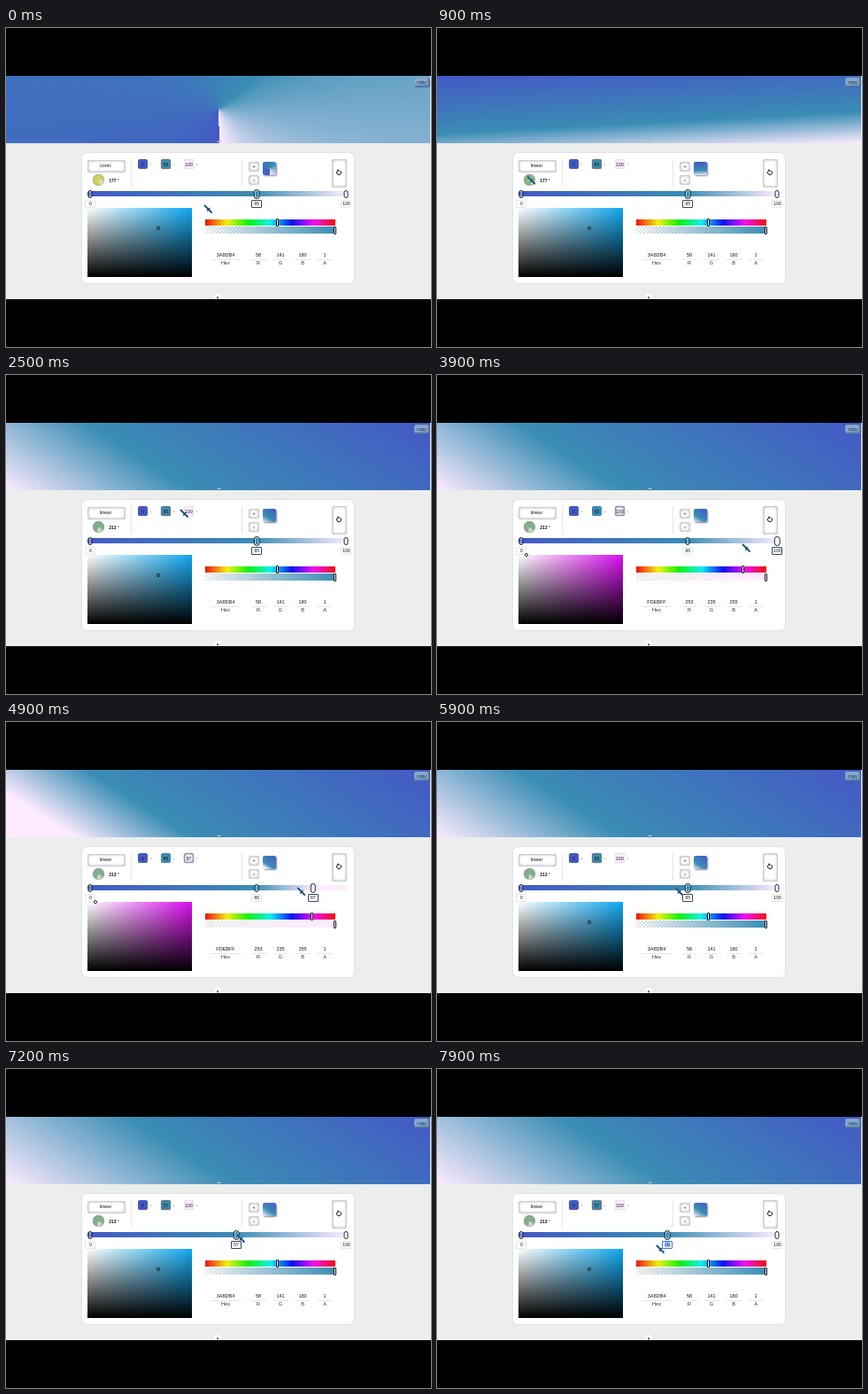
Animation of 480x360 px, one loop 8000 ms. Source, as an HTML page:

```html
<!DOCTYPE html>
<html lang="en">
<head>
<meta charset="utf-8">
<title>Gradient editor</title>
<style>
html, body { margin: 0; width: 100%; height: 100%; overflow: hidden; background: #000; }
#stage { position: absolute; left: 0; top: 0; width: 480px; height: 360px; overflow: hidden; background: #000;
  font: 5.5px/1 "Liberation Sans", Arial, sans-serif; color: #111; }
#stage div { position: absolute; box-sizing: border-box; }
#stage svg { position: absolute; left: 0; top: 0; overflow: visible; }
.t { white-space: nowrap; transform: translate(-50%, -50%); }
.btn { background: #fff; border-radius: 3px; box-shadow: inset 0 0 3px 1px #b4b4bc, 0 0 1px #ccc; }
.sw { border-radius: 2.5px; box-shadow: inset 0 0 1px #3338; }
.sw.on { box-shadow: inset 0 0 2px 1px #68757e, 0 0 2px #aaa; }
.grip { width: 5px; height: 9px; top: 183px; border: 1px solid #1b2733; border-radius: 3px;
  box-shadow: inset 0 0 0 .8px #fff; transform: translateX(-50%); }
.grip.on { width: 6.5px; height: 10.5px; top: 182px; border-radius: 3.5px; }
.tag { border: 1px solid #e6e6e6; border-radius: 1px; transform: translateX(-50%); background: #fff; }
.tag.on { border-color: #34465a; }
.tag.on.hit { border-color: #3b78d8; }
.hit .t { background: #3973d0; color: #fff; }
.pin { border: 1px solid #111; border-radius: 1px; background: #fff; }
</style>
</head>
<body>
<div id="stage"></div>
<script>
const LOOP = 8000;
const COLORS = ['#4459c5', '#3a8db4', '#fdebff'];
const stage = document.getElementById('stage');

function box(x, y, w, h, css = '', cls = '', parent = stage) {
  const el = document.createElement('div');
  el.className = cls;
  el.style.cssText = `left:${x}px;top:${y}px;width:${w}px;height:${h}px;${css}`;
  return parent.appendChild(el);
}
function label(x, y, str, css = '', parent = stage) {
  const el = document.createElement('div');
  el.className = 't';
  el.style.cssText = `left:${x}px;top:${y}px;${css}`;
  el.textContent = str;
  return parent.appendChild(el);
}
function svg(markup) {
  const el = document.createElementNS('http://www.w3.org/2000/svg', 'svg');
  el.setAttribute('width', 480);
  el.setAttribute('height', 360);
  el.innerHTML = markup;
  return stage.appendChild(el);
}
function describe(hex) {
  const rgb = [1, 3, 5].map(i => parseInt(hex.slice(i, i + 2), 16));
  const [r, g, b] = rgb, max = Math.max(...rgb), span = max - Math.min(...rgb);
  const side = max === r ? (g - b) / span : max === g ? 2 + (b - r) / span : 4 + (r - g) / span;
  return { rgb, hue: (side * 60 + 360) % 360, sat: span / max, val: max / 255 };
}

// Page, banner and card
box(0, 54, 480, 252, 'background:#ebeeed');
const banner = box(0, 54, 479, 76);
box(461, 56, 17, 10, 'border-radius:2px;background:#86a9cc;box-shadow:inset -1px -1px 2px #466f9f,1px 1px 1px #456cab');
label(469.5, 61, 'copy', 'color:#15283c;font-size:5px');
label(240.5, 128.5, '•••', 'color:#fff;font-size:4.5px;text-shadow:0 0 1px #334');
box(235, 300, 8, 6, 'background:#fff;border-radius:4px 4px 0 0');
label(239, 304, '▾', 'font-size:5px;color:#222');
box(85, 140, 309, 149, 'background:#fff;border:1px solid #e0e3e3;border-radius:7px');

// Type, angle and swatches
box(92, 149, 43, 14, '', 'btn');
const type = label(112.5, 156, '');
const knob = box(97.5, 165, 13, 13, 'border-radius:50%;box-shadow:inset 0 0 2px #888,0 0 1px #aaa');
const angle = label(122, 171.5, '', 'font-weight:bold;font-size:5px');
for (const x of [141, 266]) box(x, 148, 1, 31, 'background:#e6e6e6');

const swatches = COLORS.map((color, i) => {
  const x = 149 + i * 26;
  const el = box(x, 148, 11, 11, `background:${color}`, 'sw');
  label(x + 14.5, 153.5, '×', 'color:#b5a5aa;font-size:5px');
  return { el, text: label(5.5, 5.7, '', 'font-size:5px', el) };
});

// Action buttons
box(274, 151, 12, 11, '', 'btn');
label(280, 156, '+', 'font-size:6px');
box(274, 166, 12, 11, '', 'btn');
label(280, 171.5, '×', 'font-size:6px;color:#d04452');
const preview = box(290, 151, 15, 15, 'border-radius:2px;box-shadow:1px 1px 2px #889');
box(367.5, 148, 17, 32, '', 'btn');
svg('<path d="M377.5 161.2a2.5 2.5 0 1 1-3 0M374 160.3h1.8v1.8" fill="none" stroke="#111"/>');

// Stop track
const track = box(92, 184, 293, 6, 'border-radius:2px');
const stopX = v => 95.4 + v * 2.89;
const stops = COLORS.map(color => {
  const tag = box(0, 194, 12, 8.5, '', 'tag');
  return { tag, text: label(5, 3.3, '', 'font-size:5px', tag), grip: null, color };
});
for (const s of stops) {
  s.grip = stage.appendChild(document.createElement('div'));
  s.grip.className = 'grip';
  s.grip.style.background = s.color;
}

// Colour picker
const field = box(92, 203, 118, 78);
const spot = box(0, 0, 3.6, 3.6, 'border:.8px solid #111;border-radius:50%');
const hues = Array.from({ length: 7 }, (_, i) => `hsl(${i * 60} 88% 50%)`);
box(225, 216, 147, 7, `background:linear-gradient(90deg,${hues})`);
box(225, 224, 147, 8, 'background:repeating-conic-gradient(#e6e6e6 0 25%,#fff 0 50%) 0 0/4px 4px');
const alpha = box(225, 224, 147, 8);
const huePin = box(0, 215, 3, 9, '', 'pin');
box(370, 223.5, 3, 9.5, '', 'pin');
const fields = ['Hex', 'R', 'G', 'B', 'A'].map((name, i) => {
  const x = i ? 260 + i * 25 : 248, w = i ? 17 : 34;
  box(x - w / 2, 261, w, 1, 'background:#e2e8e6');
  label(x, 265.5, name, 'color:#16343a');
  return label(x, 257, '');
});

const cursor = svg(`<g fill="none" stroke-linecap="round">
  <path d="M.5 .5L8 8" stroke="#5d9ccb" stroke-width="2.4"/>
  <path d="M.5 .5L8 8M3.4 6L6 3.4" stroke="#1d426e" stroke-width="1.3"/></g>`);

// Motion
function ramp(t, from, to) {
  const u = Math.min(1, Math.max(0, (t - from) / (to - from)));
  return u * u * (3 - 2 * u);
}
const turn = t => 177 + 36 * ramp(t, 900, 1300);
const middle = t => 65 - 24 * ramp(t, 5900, 6400) + 16 * ramp(t, 6400, 7100);
const last = t => 100 - 21.5 * (ramp(t, 4500, 5200) - ramp(t, 5200, 5550));

// Resting places of the pointer: time, x, y
const PATH = [[0, 224, 200], [500, 112, 156], [950, 101, 169], [1500, 155, 157], [2500, 197, 152],
  [2950, 204, 153], [3900, 345, 191], [4300, 384, 187], [5550, 384, 187], [5850, 284, 187],
  [7250, 284, 187], [7900, 271, 199]];
const LEAD = 150; // a dragged grip trails the pointer

function pointer(t) {
  const i = PATH.findIndex(p => p[0] > t);
  const [t1, x1, y1] = PATH.at(i < 0 ? -1 : i), [t0, x0, y0] = PATH.at(i < 0 ? -2 : i - 1);
  const u = Math.min(1, (t - t0) / (t1 - t0));
  const drag = stopX(middle(t + LEAD)) - stopX(65) + stopX(last(t + LEAD)) - stopX(100);
  return [x0 + (x1 - x0) * u + drag, y0 + (y1 - y0) * u];
}

// Ten pictures a second, with one beat held in every second.
function tick(ms) {
  const n = Math.floor(ms / 100);
  return (n % 10 === 6 ? n - 1 : n) * 100;
}

function render(t) {
  const linear = t >= 700;
  const deg = Math.round(turn(t));
  const values = [0, middle(t), last(t)].map(Math.round);
  const active = t >= 2900 && t < 5800 ? 2 : 1;
  const list = COLORS.map((c, i) => `${c} ${values[i]}%`).join();
  const fill = linear ? `linear-gradient(${deg}deg,${list})` : `conic-gradient(from ${deg}deg,${list})`;
  banner.style.background = preview.style.background = fill;
  track.style.background = `linear-gradient(90deg,${list})`;
  type.textContent = linear ? 'linear' : 'conic';
  angle.textContent = deg + ' °';
  const fade = ramp(t, 0, 1500);
  const tint = `hsl(${62 + 68 * fade} ${56 - 34 * fade}% 60%)`;
  knob.style.background = `conic-gradient(from ${deg}deg,${tint} 70%,#e4e8dc 88%,${tint})`;

  stops.forEach(({ tag, text, grip }, i) => {
    const on = i === active;
    swatches[i].el.classList.toggle('on', on);
    swatches[i].text.textContent = text.textContent = values[i];
    tag.style.left = grip.style.left = stopX(values[i]) + 'px';
    tag.classList.toggle('on', on);
    tag.classList.toggle('hit', on && t >= 7700);
    grip.classList.toggle('on', on);
  });

  const hex = COLORS[active];
  const { rgb, hue, sat, val } = describe(hex);
  field.style.background = `linear-gradient(transparent,#000),linear-gradient(90deg,#fff,hsl(${hue} 88% 50%))`;
  spot.style.left = 90.2 + sat * 118 + 'px';
  spot.style.top = 201.2 + (1 - val) * 78 + 'px';
  huePin.style.left = 223.5 + hue / 360 * 147 + 'px';
  alpha.style.background = `linear-gradient(90deg,rgba(${rgb},0),rgb(${rgb}))`;
  [hex.slice(1).toUpperCase(), ...rgb, 1].forEach((v, i) => fields[i].textContent = v);

  const [x, y] = pointer(t);
  cursor.style.transform = `translate(${x}px,${y}px)`;
}

let start;
function loop(now) {
  start ??= now;
  render(tick((now - start) % LOOP));
  requestAnimationFrame(loop);
}
render(0);
requestAnimationFrame(loop);
</script>
</body>
</html>
```
